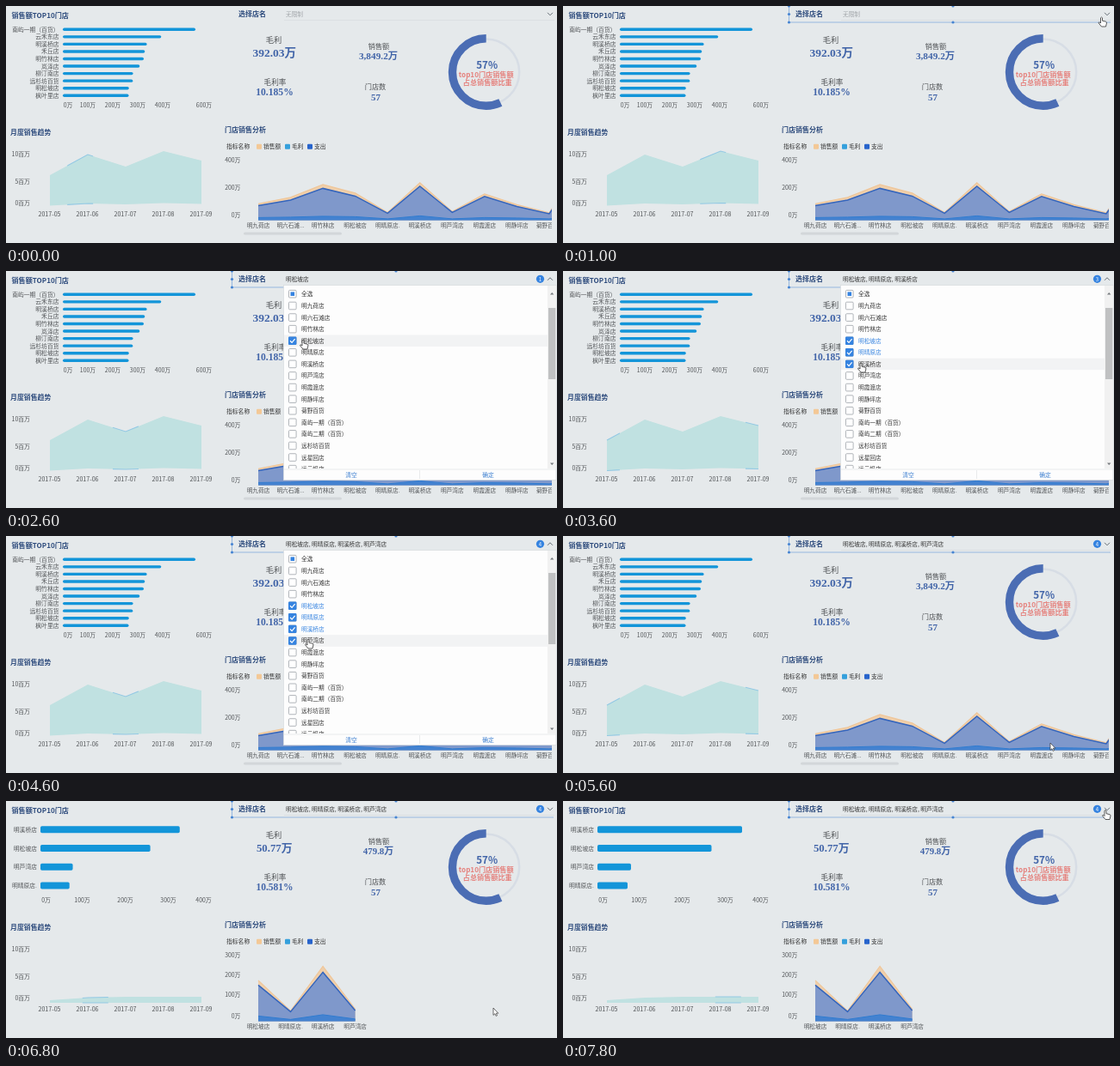
Animation, 640 px wide and 276 px high, one loop 8000 ms. Source, as an HTML page:

```html
<!DOCTYPE html>
<html lang="zh-CN">
<head>
<meta charset="utf-8">
<title>门店销售看板</title>
<style>
html, body { margin: 0; width: 100%; height: 100%; overflow: hidden; background: #e5e9eb; }
svg { display: block; width: 100%; height: 100%; }
text { font-family: "Noto Sans CJK SC", "Noto Sans CJK JP", "Noto Sans", sans-serif; fill: #505356; white-space: pre; }
.title { font-weight: 700; fill: #2c4a7c; }
.value { font-family: "Liberation Serif", "Noto Sans CJK SC", serif; font-weight: 700; fill: #4164a8; }
.dark { fill: #333; }
.link { fill: #3d7fd0; }
</style>
</head>
<body>
<svg id="stage" viewBox="0 0 640 276" preserveAspectRatio="none"></svg>
<script>
const LOOP = 8000, STEP = 200;
const OPEN = 1200, LOADED = 2000, CONFIRM = 5200, REFRESH = 6200;
const stage = document.getElementById('stage');

function add(parent, tag, attrs = {}, content) {
  const el = document.createElementNS('http://www.w3.org/2000/svg', tag);
  for (const key in attrs) el.setAttribute(key, attrs[key]);
  if (content !== undefined) el.textContent = content;
  parent.append(el);
  return el;
}
const group = (parent, attrs) => add(parent, 'g', attrs);
const path = (parent, d, attrs) => add(parent, 'path', { d, fill: 'none', ...attrs });
const rect = (parent, x, y, width, height, fill, attrs) =>
  add(parent, 'rect', { x, y, width, height, fill, ...attrs });
// y is the vertical middle of the glyphs
function label(parent, content, x, y, size, cls = '', anchor = 'start') {
  return add(parent, 'text', { x, y: y + size * 0.37, 'font-size': size, class: cls, 'text-anchor': anchor }, content);
}
const show = (el, on) => el.setAttribute('visibility', on ? 'inherit' : 'hidden');
const line = (xs, ys) => 'M' + xs.map((x, i) => x + ' ' + ys[i]).join('L');
const area = (xs, tops, bottoms) =>
  line(xs.concat([...xs].reverse()), tops.concat([...bottoms].reverse())) + 'Z';

function clipBox(id, x, y, width, height) {
  return rect(add(stage, 'clipPath', { id }), x, y, width, height);
}

const shops = ['明九荷店', '明六石滩店', '明竹林店', '明松坡店', '明晴原店', '明溪桥店', '明芦湾店',
  '明霞渡店', '明静坪店', '菊野百货', '南屿一期（百货）', '南屿二期（百货）', '远杉坊百货', '远星回店', '远云帆店'];
const axisName = name => ({ 明六石滩店: '明六石滩...', 明晴原店: '明晴原店.' })[name] || name;

// Fixed parts
rect(stage, 0, 0, 640, 276, '#e5e9eb');
label(stage, '销售额TOP10门店', 6.5, 11, 8.1, 'title');
label(stage, '月度销售趋势', 5, 147, 7.9, 'title');
label(stage, '门店销售分析', 254, 144, 8, 'title');
label(stage, '选择店名', 270, 9.3, 8, 'title');
label(stage, '指标名称', 256, 163.8, 6.8, 'dark');
[['销售额', 291, '#f3c896'], ['毛利', 324, '#35a0dc'], ['支出', 350, '#2764cc']].forEach(([name, x, color]) => {
  rect(stage, x, 160.8, 6, 6, color, { rx: 1 });
  label(stage, name, x + 8, 163.8, 6.8, 'dark');
});
label(stage, '毛利', 311, 39.6, 9.3, '', 'middle');
label(stage, '销售额', 433, 46.8, 8.2, '', 'middle');
label(stage, '毛利率', 312.5, 88.6, 8.6, '', 'middle');
label(stage, '门店数', 429, 94.4, 8.2, '', 'middle');
label(stage, '57', 429.5, 106.2, 11, 'value', 'middle');

const ring = group(stage, { transform: 'translate(557.7 77)', fill: 'none' });
add(ring, 'circle', { r: 38.5, stroke: '#d7dde5', 'stroke-width': 2.5 });
add(ring, 'circle', {
  r: 39.2, stroke: '#4b6db4', 'stroke-width': 9.4,
  pathLength: 100, 'stroke-dasharray': '57 43', transform: 'matrix(0 -1 -1 0 0 0)'
});
label(stage, '57%', 558.7, 68.3, 11.6, 'title', 'middle').style.fill = '#4164a8';
label(stage, 'top10门店销售额', 557.7, 79.5, 8.15, 'title', 'middle').style.fill = '#e5807c';
label(stage, '占总销售额比重', 559.3, 88.8, 8.15, 'title', 'middle').style.fill = '#e5807c';

const months = [51, 95, 139, 183, 227];
['10百万', '5百万', '0百万'].forEach((name, i) => label(stage, name, 28, [172, 204, 229.6][i], 6.9, '', 'end'));
months.forEach((x, i) => label(stage, '2017-0' + (i + 5), x - 0.5, 242.3, 7.1, '', 'middle'));

const before = {
  id: 'before',
  names: ['南屿一期（百货）', '云禾东店', '明溪桥店', '禾丘店', '明竹林店', '岚泽店', '柳汀南店', '远杉坊百货', '明松坡店', '枫叶里店'],
  bars: [220, 180.3, 163.6, 161.3, 160, 155.3, 147.6, 147.3, 142.8, 142.5],
  left: 66, top: 27.3, pitch: 8.55, thick: 3.4, labelX: 61.5,
  ticks: [['0万', 72], ['100万', 95], ['200万', 124], ['300万', 153], ['400万', 182], ['600万', 230]],
  trend: [[197, 173, 187, 169, 180], [232.5, 230, 231, 229.5, 230.5]],
  points: shops.slice(0, 11),
  cost: [233, 226.5, 213, 222, 242, 210.5, 241, 222.5, 234, 242.5, 190],
  sales: [231, 223.5, 208.5, 218.5, 241, 206.5, 240, 219.5, 232, 241.5, 183],
  profit: [247, 246.5, 245.5, 246, 248.5, 245, 248.5, 247, 247.5, 248.5, 244],
  base: 250, axis: [['400万', 179], ['200万', 211], ['0万', 243]],
  values: [['392.03万', 13.5], ['3,849.2万', 11.3], ['10.185%', 11.6]]
};
const after = {
  id: 'after',
  names: ['明溪桥店', '明松坡店', '明芦湾店', '明晴原店.'],
  bars: [208, 172.5, 79, 75],
  left: 40, top: 33.3, pitch: 21.7, thick: 8, labelX: 36,
  ticks: [['0万', 46.5], ['100万', 88.5], ['200万', 138.5], ['300万', 188.5], ['400万', 229.5]],
  trend: [[232, 229, 228, 228, 228], [235, 235, 235, 235, 235]],
  points: shops.slice(3, 7),
  cost: [215, 246, 200, 244.5],
  sales: [209.5, 245, 193, 243],
  profit: [251, 255, 249.5, 254.5],
  base: 257, axis: [['300万', 179], ['200万', 202.5], ['100万', 225.5], ['0万', 250]],
  values: [['50.77万', 12.8], ['479.8万', 10.9], ['10.581%', 11.5]]
};

function dashboard(data) {
  const root = group(stage), { id, base } = data;
  const bars = data.bars.map((end, i) => {
    const y = data.top + i * data.pitch;
    label(root, data.names[i], data.labelX, y, 6.8, '', 'end');
    return rect(root, data.left, y - data.thick / 2, end - data.left, data.thick, '#1395d9', { rx: 1.7 });
  });
  data.ticks.forEach(([name, x]) => label(root, name, x, 115.4, 6.9, '', 'middle'));
  data.values.forEach(([value, size], i) =>
    label(root, value, [311.7, 432.5, 312][i], [53.8, 57.8, 99.8][i], size, 'value', 'middle'));

  const trendClip = clipBox(id + 'Trend', 50, 150, 178, 90);
  const trend = group(root, { 'clip-path': `url(#${id}Trend)` });
  path(trend, area(months, ...data.trend), { fill: '#c0e1e1' });
  const glow = [0, 1].map(i => clipBox(id + 'Glow' + i, 0, 150, 30, 90));
  glow.forEach((box, i) => {
    const lit = group(trend, { 'clip-path': `url(#${id}Glow${i})` });
    data.trend.forEach(edge => path(lit, line(months, edge), { stroke: '#93c9e4', 'stroke-width': 1.1 }));
  });

  const xs = data.points.map((_, i) => 293 + i * 37.55);
  const floor = xs.map(() => base);
  data.axis.forEach(([name, y]) => label(root, name, 272.5, y, 6.9, '', 'end'));
  const areaClip = clipBox(id + 'Area', 292, 165, 342, 111);
  const plot = group(root, { transform: 'translate(0 -0.6)' });
  const chart = group(plot, { 'clip-path': `url(#${id}Area)` });
  path(chart, area(xs, data.sales, floor), { fill: '#efcfab' });
  path(chart, area(xs, data.cost, floor), { fill: '#7f98cb' });
  path(chart, area(xs, data.profit, floor), { fill: '#4482d0' });
  path(chart, line(xs, data.sales), { stroke: '#f0c698', 'stroke-width': 1.2 });
  path(chart, line(xs, data.cost), { stroke: '#3465bd', 'stroke-width': 1.5 });
  path(chart, line(xs, data.profit), { stroke: '#2f7bd0', 'stroke-width': 1 });
  const axis = group(plot, { 'clip-path': 'url(#axisClip)' });
  data.points.forEach((name, i) => label(axis, axisName(name), i === 9 ? 629 : xs[i], base + 6.3, 6.7, '', 'middle'));
  if (id === 'before') rect(root, 276, 263.5, 114, 3, '#d2d6d9', { rx: 1.5 });

  return (visible, grow, phase) => {
    show(root, visible);
    if (!visible) return;
    bars.forEach((bar, i) => bar.setAttribute('width', (data.bars[i] - data.left) * grow));
    const reveal = Math.min(1, grow * 1.05);
    trendClip.setAttribute('width', 178 * reveal);
    areaClip.setAttribute('width', 342 * reveal);
    const x = 36 + phase * 176;
    glow[0].setAttribute('x', x);
    glow[1].setAttribute('x', phase < 0.5 ? x + 176 : x - 176);
  };
}
clipBox('axisClip', 270, 245, 364, 31);
const drawBefore = dashboard(before), drawAfter = dashboard(after);

// Store selector
path(stage, 'M323 16.5H637', { stroke: '#d9dde0', 'stroke-width': 0.8 });
const frame = group(stage);
path(frame, 'M262.5 0V19H636', { stroke: '#8db1de', 'stroke-width': 0.9 });
[[262.5, 0], [262.5, 9.5], [262.5, 19], [453, 0], [453, 19]].forEach(([cx, cy]) =>
  add(frame, 'circle', { cx, cy, r: 1.6, fill: '#4684d2' }));
const chosenText = label(stage, '', 325, 9.3, 6.7);
const badge = group(stage);
add(badge, 'circle', { cx: 620.5, cy: 9.3, r: 4.6, fill: '#3583e0' });
const badgeText = label(badge, '', 620.5, 9.3, 6, '', 'middle');
badgeText.style.fill = '#fff';
const chevron = path(stage, '', { stroke: '#687078', 'stroke-width': 1 });

function footer(parent, y) {
  path(parent, `M323 ${y - 6}H639M480.5 ${y - 5}V${y + 5}`, { stroke: '#e4e6e8', 'stroke-width': 0.8 });
  label(parent, '清空', 401, y, 6.8, 'link', 'middle');
  label(parent, '确定', 560, y, 6.8, 'link', 'middle');
}
const loading = group(stage);
rect(loading, 322.5, 16.5, 316.5, 213.5, '#fdfdfd', { stroke: '#d8dcdf', 'stroke-width': 0.7 });
rect(loading, 330.5, 77.5, 298.5, 10, 'none', { stroke: '#eceeef', 'stroke-width': 0.8 });
footer(loading, 223.5);
const loadBars = [475.5, 480, 484.5].map(x => rect(loading, x, 112, 1.8, 8, '#6d9bd0'));

const list = group(stage);
rect(list, 322.5, 16.5, 316.5, 227, '#fdfdfd', { stroke: '#d8dcdf', 'stroke-width': 0.7 });
clipBox('listClip', 323, 17, 316, 213);
const rowsRoot = group(list, { 'clip-path': 'url(#listClip)' });
const rowY = i => 40.5 + i * 13.58;
const checkbox = (parent, y) =>
  rect(parent, 328.5, y - 4.3, 8.6, 8.6, '#fff', { rx: 1, stroke: '#9da3a9', 'stroke-width': 0.8 });
checkbox(rowsRoot, 26.7);
const partial = rect(rowsRoot, 330.5, 24.4, 4.6, 4.6, '#3583e0');
label(rowsRoot, '全选', 343, 26.7, 6.7, 'dark');
const rows = shops.map((name, i) => {
  const y = rowY(i);
  const hover = rect(rowsRoot, 323, y - 6.8, 306, 13.6, '#f2f3f4');
  checkbox(rowsRoot, y);
  const mark = group(rowsRoot);
  rect(mark, 328, y - 4.7, 9.4, 9.4, '#3583e0', { rx: 1 });
  path(mark, `M330 ${y}l2.1 2.2l3.5 -4.2`, { stroke: '#fff', 'stroke-width': 1.2 });
  return { hover, mark, text: label(rowsRoot, name, 343, y, 6.7) };
});
rect(list, 629, 17, 10, 213, '#f1f1f1');
rect(list, 630, 43, 8.3, 83, '#c0c1c2');
path(list, 'M632 27.5l2.2 -2.5l2.2 2.5zM632 223.5l2.2 2.5l2.2 -2.5z', { fill: '#75797d' });
footer(list, 237);

// Pointer: both shapes have their hotspot at 0,0
const hand = path(stage, 'M-1 .8Q0 -.8 1 .8V4.2L5 5.2Q6.2 5.6 5.9 7L5 11H0L-3.4 6.8Q-3.4 5.5 -2 6L-1 7Z',
  { fill: '#fff', stroke: '#333', 'stroke-width': 0.8, 'stroke-linejoin': 'round' });
const arrow = path(stage, 'M0 0V8.4L1.9 6.7L3.2 9.4L4.5 8.8L3.3 6.2H5.8Z',
  { fill: '#fff', stroke: '#333', 'stroke-width': 0.7 });
const route = [[600, 646, 34], [1000, 625.5, 13], [1900, 625.5, 13], [2300, 345, 80], [2600, 345, 80],
  [2800, 345, 94], [3000, 345, 94], [3200, 346, 107], [3800, 346, 107], [4200, 351, 120], [4600, 351, 120],
  [5000, 566, 241], [7200, 566, 241], [7600, 630, 10.5], [8000, 630, 10.5]];
const checks = [[3, 2400], [4, 2800], [5, 3200], [6, 4200]];

function pointerAt(t) {
  const i = route.findIndex(stop => stop[0] > t);
  if (i < 1) return [700, 40];
  const [t0, x0, y0] = route[i - 1], [t1, x1, y1] = route[i];
  const p = (t - t0) / (t1 - t0), e = p * p * (3 - 2 * p);
  return [x0 + (x1 - x0) * e, y0 + (y1 - y0) * e];
}

function draw(t) {
  const isNew = t >= REFRESH, isOpen = t >= OPEN && t < CONFIRM, isLoaded = t >= LOADED;
  const grow = 1 - Math.pow(1 - Math.min(1, Math.max(0, (t - REFRESH) / 900)), 3);
  drawBefore(!isNew, 1, ((t + 400) / 2000) % 1);
  drawAfter(isNew, grow, ((t - REFRESH) / 2000) % 1);

  const [x, y] = pointerAt(t);
  const chosen = checks.filter(([, at]) => t >= at).map(([i]) => i);
  show(frame, t >= 1000);
  chosenText.textContent = chosen.length ? chosen.map(i => shops[i]).join(', ') : '无限制';
  chosenText.style.fill = chosen.length ? '#333' : '#a0a4a8';
  show(badge, chosen.length);
  badgeText.textContent = chosen.length;
  chevron.setAttribute('d', isOpen && isLoaded ? 'M629 10.8l3 -3l3 3' : 'M629 7.8l3 3l3 -3');

  show(loading, isOpen && !isLoaded);
  loadBars.forEach((bar, i) => {
    const h = 8 + 4 * Math.sin(t / 160 - i * 1.1 + 5);
    bar.setAttribute('y', 116 - h / 2);
    bar.setAttribute('height', h);
  });
  show(list, isOpen && isLoaded);
  show(partial, chosen.length);
  rows.forEach(({ hover, mark, text }, i) => {
    const over = x < 629 && y < 230 && Math.abs(y + 1 - rowY(i)) < 6.8;
    const on = chosen.includes(i);
    show(hover, over);
    show(mark, on);
    text.style.fill = on && !over ? '#3583e0' : '#333';
  });

  const isArrow = t < 1000 || (t >= CONFIRM && t < 7600);
  [hand, arrow].forEach(el => el.setAttribute('transform', `translate(${x} ${y})`));
  show(hand, !isArrow);
  show(arrow, isArrow);
}

const start = performance.now();
function tick() {
  const t = (performance.now() - start) % LOOP;
  draw(Math.floor(t / STEP) * STEP);
  requestAnimationFrame(tick);
}
tick();
</script>
</body>
</html>
```
